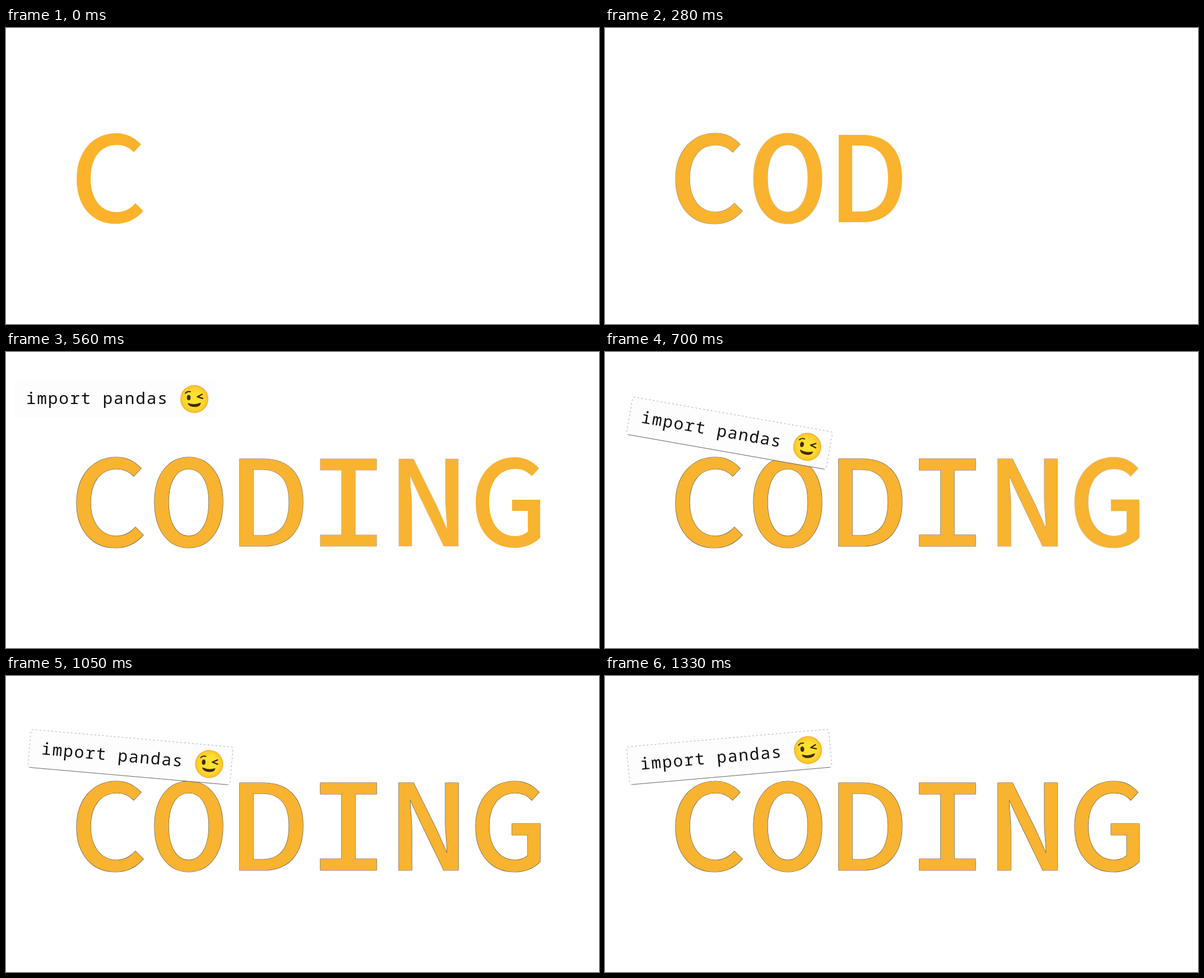
An HTML page for the animation above (1400 ms loop, 1058 by 529 pixels).

```html
<!DOCTYPE html>
<html lang="en">
<head>
<meta charset="utf-8">
<title>Coding</title>
<style>
  html, body { margin: 0; width: 100%; height: 100%; overflow: hidden; background: #fff; }
  svg { display: block; width: 100vw; height: 100vh; }
  #word { stroke: #1c1810; stroke-width: 1.2; paint-order: stroke; fill-rule: evenodd; }
  #edge { fill: none; stroke-width: .8; }
  text { font: 29.5px "Noto Sans Mono", "DejaVu Sans Mono", monospace; letter-spacing: 1.85px; fill: #111; }
</style>
</head>
<body>
<svg viewBox="0 0 1058 529">
  <defs>
    <radialGradient id="skin">
      <stop offset=".5" stop-color="#fde030"/>
      <stop offset=".9" stop-color="#fbcb2a"/>
      <stop offset="1" stop-color="#f2a52a"/>
    </radialGradient>
  </defs>
  <g id="word" role="img" aria-label="CODING">
    <path d="M241 208C230 196 215 188 197 188C156 188 126 220 126 270C126 320 155 350 195 350C215 350 232 342 245 327L231 313C221 324 210 329 198 329C169 329 151 305 151 269C151 232 169 209 198 209C210 209 219 213 228 222Z"/>
    <path d="M326 188C363 188 387 220 387 268C387 318 363 350 326 350C289 350 265 318 265 268C265 220 289 188 326 188ZM326 209C304 209 290 232 290 268C290 305 304 329 326 329C348 329 362 305 362 268C362 232 348 209 326 209Z"/>
    <path d="M417 191H459C505 191 530 219 530 268C530 318 505 347 460 347H417ZM441 210V328H457C490 328 505 307 505 268C505 231 490 210 457 210Z"/>
    <path d="M561 191H661V211H623V327H661V347H561V327H599V211H561Z"/>
    <path d="M701 347V191H727L768 274L787 317C787 300 784 280 784 262V191H807V347H781L739 260L721 221C721 240 724 258 724 275V347Z"/>
    <path d="M951 208C941 196 926 188 908 188C867 188 838 220 838 269C838 319 866 350 907 350C926 350 942 343 953 332V264H903V284H931V321C925 326 917 329 909 329C880 329 862 305 862 268C862 232 880 209 909 209C921 209 930 213 938 222Z"/>
  </g>
  <g id="label">
    <rect x="-181" y="-34" width="362" height="68" rx="4" fill="#fdfdfd"/>
    <g id="edge">
      <path d="M-177 34Q-181 34 -181 30V-30Q-181 -34 -177 -34H177Q181 -34 181 -30V30Q181 34 177 34" stroke="#999" stroke-dasharray="3 4"/>
      <path d="M-177 34H177" stroke="#444"/>
    </g>
    <text x="-159.3" y="9">import pandas</text>
    <g transform="translate(141)" fill="none" stroke="#422b0d" stroke-linecap="round" stroke-linejoin="round">
      <circle r="25" fill="url(#skin)" stroke="none"/>
      <ellipse cx="-10" cy="-2.5" rx="3.3" ry="4.7" fill="#422b0d" stroke="none"/>
      <path d="M-16 -10Q-12.5 -14.5 -7 -13" stroke-width="2"/>
      <path d="M14 -8.5L5.5 -4L15 -1" stroke-width="2.4"/>
      <path d="M-11 8Q0 12 11 7.5Q9.5 13.5 0 13.5Q-8.5 13.5 -11 8Z" fill="#422b0d" stroke-width="1.5"/>
    </g>
  </g>
</svg>
<script>
  const LOOP = 1400, STEP = 70, LETTER = 110;
  // time, centre x, centre y, angle
  const poses = [
    [350, 25, -35, -22], [420, 93.4, 16, -15], [560, 195, 84, 0],
    [630, 222, 124, 6], [700, 222, 145, 10], [840, 221.7, 144.5, -10],
    [1050, 222, 145, 5], [1330, 221.7, 144.7, -5]
  ];
  const [word, label, edge] = ["word", "label", "edge"].map(id => document.getElementById(id));
  const start = performance.now();

  const clamp = v => Math.max(0, Math.min(1, v));
  const show = (node, on) => node.style.display = on ? "" : "none";

  function poseAt(t) {
    const i = Math.max(1, poses.findIndex(p => p[0] >= t));
    const a = poses[i - 1], b = poses[i];
    const k = (t - a[0]) / (b[0] - a[0]);
    return a.map((v, n) => v + (b[n] - v) * k);
  }

  function draw() {
    const now = performance.now() - start;
    const t = Math.floor(now % LOOP / STEP) * STEP;
    const age = clamp(t / 560);

    // each letter's outline darkens after it appears
    [...word.children].forEach((path, i) => {
      const shown = t - i * LETTER;
      show(path, shown >= 0);
      path.style.strokeOpacity = .8 * clamp((shown - 50) / 350);
    });
    word.style.fill = `rgb(${252 - 4 * age}, 179, ${43 + 6 * age})`;

    const inside = t >= poses[0][0];
    show(label, inside);
    if (inside) {
      const [, x, y, angle] = poseAt(t);
      label.setAttribute("transform", `translate(${x} ${y}) rotate(${angle})`);
      show(edge, Math.abs(angle) > .1);
      edge.style.opacity = clamp((t - 280) / 420);
    }
    requestAnimationFrame(draw);
  }
  draw();
</script>
</body>
</html>
```
